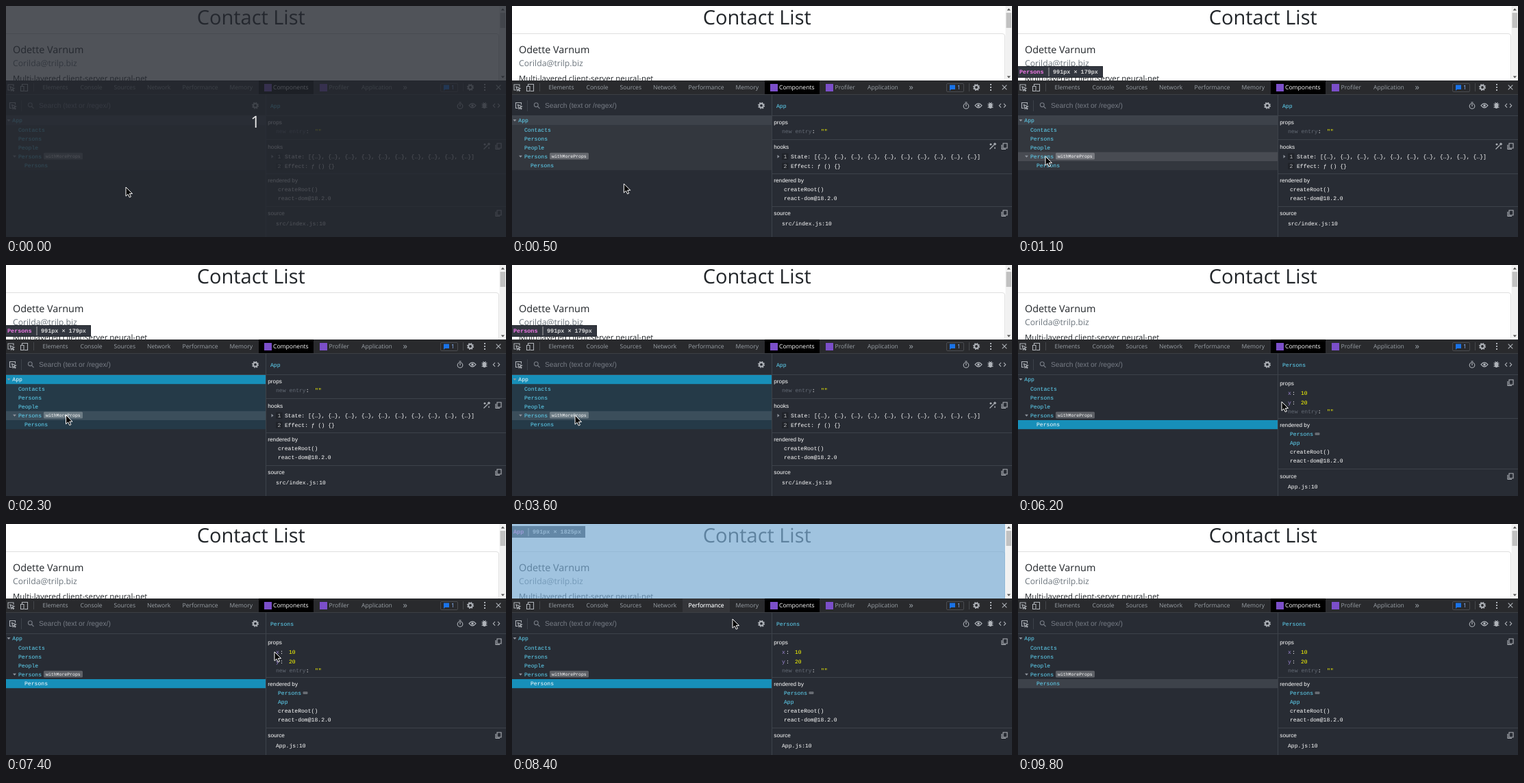
These frames come from a looping animation (730x338 px, 9.9 s). An HTML page:

```html
<!DOCTYPE html>
<html lang="en">
<head>
<meta charset="utf-8">
<title>Contact List</title>
<style>
  html, body { margin: 0; width: 100%; height: 100%; overflow: hidden; background: #282c34; }
  svg { display: block; width: 730px; height: 338px; text-rendering: geometricPrecision; }
  text { white-space: pre; }
  .page, .tabs { font-family: "Open Sans", "Noto Sans", sans-serif; }
  .tabs { font-size: 8.6px; fill: #9aa0a6; }
  .tabs .lit { fill: #fff; }
  .mono { font: 8.1px "Liberation Mono", "DejaVu Sans Mono", monospace; fill: #fff; }
  .label { font: 8.2px "Liberation Sans", Arial, sans-serif; fill: #fff; }
  .ui { font: 10.25px "Liberation Sans", Arial, sans-serif; fill: #777c85; }
  .tip { font: bold 8.46px "Liberation Mono", monospace; fill: #d7d7d7; }
  .tip .name { fill: #ee78e6; }
  .comp { fill: #61dafb; }
  .attr { fill: #9d87d2; }
  .val { fill: yellow; }
  .new { fill: #646a75; }
  .line { stroke: #3d424a; fill: none; }
  .icon { stroke: #afb3b9; fill: none; stroke-width: 1.1; }
  .icon .solid { fill: #afb3b9; stroke: none; }
  .tri { fill: #8f949d; }
</style>
</head>
<body>
<svg viewBox="0 0 730 338" xmlns="http://www.w3.org/2000/svg">
  <defs>
    <g id="gear">
      <circle r="2.9" stroke-width="2"/>
      <circle r="4.4" stroke-width="1.4" stroke-dasharray="1.728"/>
    </g>
    <g id="copy">
      <path d="M-2-4H4V3H-2Z"/>
      <path d="M-4-2V4.5H2"/>
    </g>
    <g id="pick">
      <path d="M4-1V-4H-4V4H-1"/>
      <path class="solid" d="M-1-1L5 1.5 2.6 2.5 4.6 4.6 3.7 5.4 1.7 3.3.7 5Z"/>
    </g>
    <clipPath id="view"><path d="M0 0H730V109H0Z"/></clipPath>
  </defs>

  <g class="page" clip-path="url(#view)">
    <path fill="#fff" d="M0 0H730V109H0Z"/>
    <path d="M0 40.5H716Q719.5 40.5 719.5 44V112" fill="none" stroke="#dfdfdf"/>
    <text x="357.7" y="27" font-size="29" font-weight="500" text-anchor="middle" fill="#212529">Contact List</text>
    <text x="10" y="69.4" font-size="14.4" font-weight="500" fill="#212529">Odette Varnum</text>
    <text x="10" y="88.3" font-size="12.2" font-weight="500" fill="#6c757d">Corilda@trilp.biz</text>
    <text x="10" y="110" font-size="11.4" fill="#212529">Multi-layered client-server neural-net</text>

    <g class="tip" data-on="800-6200">
      <path d="M0 88H124V105H0Z" fill="#23272d"/>
      <path d="M0 89H123V104H0Z" fill="#333740"/>
      <path d="M45 90V103" stroke="#aaa"/>
      <text class="name" x="2" y="99.3">Persons</text>
      <text x="51" y="99.3">991px × 179px</text>
    </g>
    <g class="tip" data-on="8300-8600">
      <path d="M0 3H107V20H0Z" fill="#333740"/>
      <path d="M24 6V18" stroke="#aaa"/>
      <text class="name" x="2" y="14.3">App</text>
      <text x="30" y="14.3">991px × 1825px</text>
      <path d="M0 0H720V109H0Z" fill="rgba(120,170,210,.7)"/>
    </g>

    <path d="M720.5 0H730V109H720.5Z" fill="#f1f1f1"/>
    <path d="M721.5 10H729V32H721.5Z" fill="#c1c1c1"/>
    <path d="M722.7 6.5L725.3 3.5 728 6.5ZM722.7 102.5H728L725.3 105.5Z" fill="#505050"/>
  </g>

  <g class="tabs">
    <path d="M0 109H730V129H0Z" fill="#292a2d"/>
    <path d="M369 109H449V129H369Z" fill="#000"/>
    <path data-on="8400-8600" d="M249 109H318V129H249Z" fill="#35363a"/>
    <path d="M0 129.5H730" stroke="#3c3f44"/>
    <path d="M40.5 113V125M667.5 113V125" stroke="#45474b"/>
    <text x="53.5" y="122">Elements</text>
    <text x="108.5" y="122">Console</text>
    <text x="157.5" y="122">Sources</text>
    <text x="206" y="122">Network</text>
    <text x="257.5" y="122">Performance</text>
    <text class="lit" data-on="8400-8600" x="257.5" y="122">Performance</text>
    <text x="326.5" y="122">Memory</text>
    <text class="lit" x="390" y="122">Components</text>
    <text x="471.5" y="122">Profiler</text>
    <text x="519" y="122">Application</text>
    <text x="579.5" y="122.5" font-size="13">»</text>
    <path d="M377 114H388V125H377ZM458 114H469V125H458Z" fill="#7b4fc9"/>
    <rect x="634.5" y="113.5" width="25" height="12" rx="1.5" fill="none" stroke="#4a4c50"/>
    <path d="M639 115.5H647V122H641L639 124Z" fill="#1a73e8"/>
    <text x="650" y="122.3" fill="#8ab4f8">1</text>
  </g>
  <g class="icon">
    <use href="#pick" x="7" y="119"/>
    <path d="M23.5 117V114.5H31.5V124.5H27M21.5 117.5H26V124.5H21.5Z"/>
    <use href="#gear" x="678" y="119"/>
    <path class="solid" d="M698 114h2v2h-2zm0 4h2v2h-2zm0 4h2v2h-2z"/>
    <path d="M715.7 115.7L722.3 122.3M722.3 115.7L715.7 122.3"/>
  </g>

  <!-- component tree -->
  <path d="M0 130H730V338H0Z" fill="#282c34"/>
  <rect id="subtree" y="174.2" width="379" height="66"/>
  <rect id="picked" width="379" height="13.2"/>
  <rect id="hover" width="379" height="13.2" fill="rgba(255,255,255,.1)"/>
  <path class="line" d="M0 160.5H379M379.5 130V338M22.5 138V154"/>
  <g class="icon">
    <use href="#pick" x="9.5" y="145.5"/>
    <g stroke="#777c85"><circle cx="35.3" cy="144.7" r="2.9"/><path d="M37.5 147L40.5 150"/></g>
    <use href="#gear" x="364" y="145.7"/>
  </g>
  <text class="ui" x="48" y="149.3">Search (text or /regex/)</text>
  <path class="tri" d="M1.5 166H6.5L4 169ZM10 218.7H15L12.5 221.7Z"/>
  <g class="mono comp">
    <text id="root" x="9.3" y="170.3">App</text>
    <text x="18" y="183.5">Contacts</text>
    <text x="18" y="196.5">Persons</text>
    <text x="18" y="209.6">People</text>
    <text x="18" y="222.7">Persons</text>
    <text id="leaf" x="27" y="235.9">Persons</text>
  </g>
  <rect x="55" y="214.8" width="57" height="9.8" rx="1.6" fill="rgba(255,255,255,.25)"/>
  <text class="mono" x="58" y="221.6" style="font-size:6.5px">withMoreProps</text>

  <!-- inspected element -->
  <g data-on="0-5100 5400-9900">
    <path class="line" d="M380 160.5H730"/>
    <g class="icon">
      <circle cx="663" cy="146.5" r="3.8"/><path d="M661.5 141H664.5M663 144V147"/>
      <path d="M676 145.7Q681 139.5 686 145.7Q681 152 676 145.7Z"/><circle class="solid" cx="681" cy="145.7" r="1.8"/>
      <ellipse class="solid" cx="698.5" cy="146" rx="2.7" ry="4"/><path d="M694.5 143.5H702.5M694.5 146H702.5M694.5 148.5H702.5M696.5 141L698 143M700.5 141L699 143"/>
      <path d="M714 142.8L711.3 145.7 714 148.6M718 142.8L720.7 145.7 718 148.6"/>
    </g>
  </g>

  <g data-on="0-5100">
    <path class="line" d="M380 195.5H730M380 245.5H730M380 293.5H730"/>
    <g class="label">
      <text x="382.3" y="173.3">props</text>
      <text x="382.3" y="208.5">hooks</text>
      <text x="382.3" y="258">rendered by</text>
      <text x="382.3" y="306">source</text>
    </g>
    <path class="tri" d="M387.5 217.7V222.7L390.5 220.2Z"/>
    <path d="M394 215.5H403.5V225H394ZM394 229.5H403.5V239H394Z" fill="rgba(0,0,0,.2)"/>
    <g class="mono">
      <text class="comp" x="386" y="148.5">App</text>
      <text x="394" y="186"><tspan class="new">new entry</tspan>:</text>
      <text class="val" x="451" y="186">""</text>
      <text x="396.5" y="223" fill-opacity=".7">1</text>
      <text id="state" x="407" y="223"></text>
      <text x="396.5" y="237" fill-opacity=".7">2</text>
      <text x="407" y="237">Effect: ƒ () {}</text>
      <text x="397" y="270.7">createRoot()</text>
      <text x="397" y="284">react-dom@18.2.0</text>
      <text x="394" y="321.3">src/index.js:10</text>
    </g>
    <g class="icon">
      <path d="M697.5 209.5L703.5 203.5M705 200V204M703 202H707M699 201V204M697.5 202.5H700.5M705 206.5V209" stroke-width="1.3"/>
      <use href="#copy" x="719" y="205"/>
      <use href="#copy" x="719" y="303"/>
    </g>
  </g>

  <text class="ui" data-on="5100-5400" x="535.3" y="237.7">Loading...</text>

  <g data-on="5400-9900">
    <path class="line" d="M380 224.5H730M380 298.5H730"/>
    <g class="label">
      <text x="382.3" y="175.5">props</text>
      <text x="382.3" y="237">rendered by</text>
      <text x="382.3" y="311.7">source</text>
    </g>
    <g class="mono">
      <text class="comp" x="386" y="148.5">Persons</text>
      <text x="394" y="190.3"><tspan class="attr">x</tspan> </text>
      <text x="400" y="190.3">:</text>
      <text class="val" x="413" y="190.3">10</text>
      <text class="attr" x="394" y="203.5">y</text>
      <text x="400" y="203.5">:</text>
      <text class="val" x="413" y="203.5">20</text>
      <text x="394" y="216.7"><tspan class="new">new entry</tspan>:</text>
      <text class="val" x="451" y="216.7">""</text>
      <text class="comp" x="397" y="249.7">Persons</text>
      <text class="comp" x="397" y="262.8">App</text>
      <text x="397" y="276">createRoot()</text>
      <text x="397" y="289.2">react-dom@18.2.0</text>
      <text x="394" y="326.7">App.js:10</text>
    </g>
    <rect x="433.5" y="245.3" width="7" height="3.6" rx="1.2" fill="#696d74"/>
    <g class="icon">
      <use href="#copy" x="719" y="172"/>
      <use href="#copy" x="719" y="309"/>
    </g>
  </g>

  <g class="page" data-on="0-100">
    <path d="M0 0H730V338H0Z" fill="rgba(37,41,48,.8)"/>
    <text x="364" y="178" font-size="24" text-anchor="middle" fill="#e8e8e8">1</text>
  </g>

  <path id="cursor" data-on="0-9800" d="M0 0V13.2L3.1 10.4 5.3 15 7.4 14 5.3 9.6H9.5Z" fill="#000" stroke="#fff"/>
</svg>
<script>
  const LOOP = 9900, STEP = 100, TOP = 161, ROW = 13.2;
  const $ = id => document.getElementById(id);

  // time, x, y of the pointer tip
  const path = [
    [0, 175, 265], [400, 175, 265], [700, 140, 250], [900, 75, 228], [1100, 40, 220],
    [1400, 33, 219], [1700, 33, 219], [2000, 92, 220], [2200, 92, 220], [2400, 83, 219],
    [2600, 83, 219], [2900, 99, 219], [3500, 99, 219], [3600, 92, 220], [3900, 58, 219],
    [4000, 58, 219], [4300, 55, 230], [5600, 55, 230], [5900, 180, 238], [6200, 385, 200],
    [6300, 393, 190], [6400, 393, 190], [6700, 384, 180], [7000, 425, 196], [7200, 410, 203],
    [7400, 392, 187], [7700, 400, 207], [7900, 418, 194], [8200, 418, 194], [8400, 322, 139],
    [8500, 322, 139], [9000, 433, 17], [LOOP, 433, 17]
  ];

  const timed = [...document.querySelectorAll("[data-on]")].map(el => ({
    el, spans: el.dataset.on.split(" ").map(s => s.split("-").map(Number))
  }));

  $("state").textContent = `State: [${Array(10).fill("{…}").join(", ")}]`;

  function pointer(t) {
    const i = path.findIndex(p => p[0] > t);
    const [t0, x0, y0] = path[i - 1], [t1, x1, y1] = path[i];
    const k = (t - t0) / (t1 - t0);
    return [x0 + (x1 - x0) * k, y0 + (y1 - y0) * k];
  }

  function show(el, on) {
    el.style.visibility = on ? "visible" : "hidden";
  }

  function draw(time) {
    const t = Math.floor(time % LOOP / STEP) * STEP;
    for (const { el, spans } of timed) show(el, spans.some(([a, b]) => t >= a && t < b));

    const [x, y] = pointer(t);
    $("cursor").setAttribute("transform", `translate(${x} ${y})`);

    const focused = t >= 1300 && t < 9800;
    const picked = t < 5100 ? 0 : 5;
    $("picked").setAttribute("y", TOP + picked * ROW);
    $("picked").setAttribute("fill", focused ? "#178fb9" : "#3d424a");
    $("subtree").setAttribute("fill", focused ? "rgba(23,143,185,.15)" : "rgba(255,255,255,.05)");
    show($("subtree"), picked === 0);
    $("root").style.fill = focused && picked === 0 ? "#fff" : "";
    $("leaf").style.fill = focused && picked === 5 ? "#fff" : "";

    const row = Math.floor((y - TOP) / ROW);
    show($("hover"), x < 379 && row >= 0 && row < 6 && row !== picked);
    $("hover").setAttribute("y", TOP + row * ROW);
  }

  const start = performance.now();
  function tick(now) {
    draw(Math.max(0, now - start));
    requestAnimationFrame(tick);
  }
  draw(0);
  requestAnimationFrame(tick);
</script>
</body>
</html>
```
